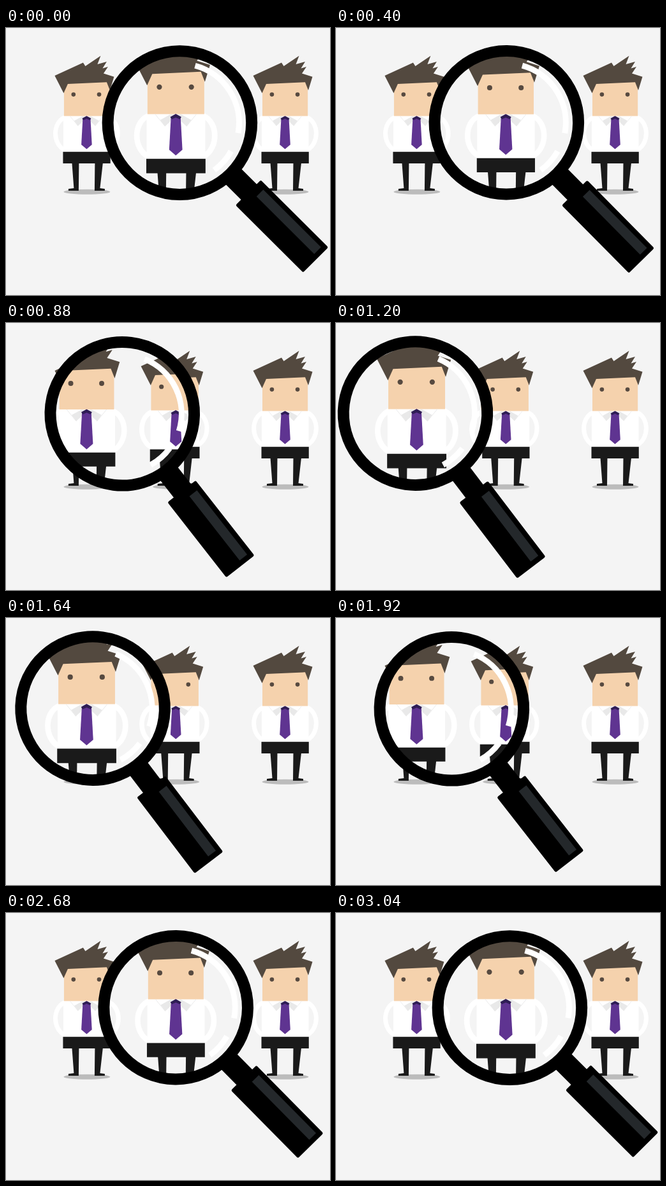
Animation of 508 by 420 pixels, one loop 3120 ms. Source, as an HTML page:

```html
<!DOCTYPE html>
<html lang="en">
<head>
<meta charset="utf-8">
<title>Magnifier</title>
<style>
  html, body { margin: 0; width: 100%; height: 100%; overflow: hidden; background: #f4f4f4; }
  svg { display: block; width: 100vw; height: 100vh; }
</style>
</head>
<body>
<svg viewBox="0 0 508 420">
  <defs>
    <clipPath id="glass"><circle id="hole" r="106"/></clipPath>
    <!-- x = 0 runs through the tie -->
    <g id="man">
      <ellipse cx=".5" cy="257.7" rx="36.5" ry="4" fill="#bcbcbc"/>
      <path d="M-35 141C-53 149-54 181-35 192M35 141C53 149 54 181 35 192" fill="none" stroke="#fff" stroke-width="7"/>
      <path d="M-36.5 138H37V196H-36.5Z" fill="#fff"/>
      <path d="M-23 212H-12L-12.5 256H-28.5V253L-20 252ZM13 212H25.5L21 252 28.5 253V256H12.5Z" fill="#1a1a1a"/>
      <path d="M-37 194.8H37.3V213H-37Z" fill="#1a1a1a"/>
      <path d="M-35.5 84H35.7V138.6H-35.5Z" fill="#f5d2ad"/>
      <path d="M-19.5 146L-7 139H7L19.5 146 13.5 154 4 145H-4L-13.5 154Z" fill="#e9e9e9"/>
      <path d="M-26 138.6L-13.5 154M26 138.6L13.5 154" stroke="#eaeaea" stroke-width=".8"/>
      <path d="M-6 142L0 138.5 6 142 8.3 183.5 0 190.6-8.3 183.5Z" fill="#5f3491"/>
      <path d="M0 138.5L7 142.2 5 145 0 142.8-5 145-7 142.2Z" fill="#2f1d55"/>
      <path d="M-50 75L-5.5 54.6-2 60 22 43.8 17 57 31.5 53 25 63.5 33.5 61 26.5 71.5 43 76.7 36.5 98 31.5 85.3-29.5 88-36 102.5Z" fill="#53493f"/>
      <circle cx="-20.6" cy="104.6" r="3.3" fill="#574a40"/>
      <circle cx="19.6" cy="104.6" r="3.3" fill="#574a40"/>
    </g>
  </defs>
  <rect width="508" height="420" fill="#f4f4f4"/>
  <use href="#man" x="126.4"/>
  <use href="#man" x="266.2"/>
  <use href="#man" x="437.5"/>
  <g clip-path="url(#glass)">
    <rect width="508" height="420" fill="#f4f4f4"/>
    <use href="#man" id="mid"/>
    <use href="#man" id="left"/>
    <use href="#man" x="437.5"/>
  </g>
  <g id="lens">
    <path id="glare" fill="none" stroke="#fff" stroke-width="9"/>
    <circle r="112.8" fill="none" stroke="#000" stroke-width="18"/>
    <rect x="112" y="-17" width="46" height="34.5"/>
    <rect x="153.5" y="-26.2" width="149.8" height="56" rx="2.5"/>
    <rect x="167" y="-18.2" width="128" height="15" fill="#24282b"/>
  </g>
</svg>
<script>
const LOOP = 3120, STEP = 40, PIVOT = 151.5;
const $ = id => document.getElementById(id);

function arc(r, from, to) {
  const at = deg => {
    const a = deg * Math.PI / 180;
    return (r * Math.cos(a)).toFixed(2) + ' ' + (r * Math.sin(a)).toFixed(2);
  };
  return `M${at(from)}A${r} ${r} 0 0 1 ${at(to)}`;
}
$('glare').setAttribute('d', arc(93, -120, -35) + arc(92, -16, 9));

// cubic-bezier(x1, 0, x2, 1)
function ease(p, x1, x2) {
  if (p <= 0) return 0;
  if (p >= 1) return 1;
  let lo = 0, hi = 1, s = .5;
  for (let i = 0; i < 30; i++) {
    s = (lo + hi) / 2;
    const x = 3 * s * (1 - s) * ((1 - s) * x1 + s * x2) + s * s * s;
    if (x < p) lo = s; else hi = s;
  }
  return s * s * (3 - 2 * s);
}

// share of the tilt along the path: [position, tilt, slope]
const TILT = [[0, 0, 1.35], [.155, .225, 1.65], [.375, .625, 1.55], [.6, .896, .7], [1, 1, 0]];

function tilt(u) {
  let i = 0;
  while (i < TILT.length - 2 && u > TILT[i + 1][0]) i++;
  const [x0, y0, m0] = TILT[i], [x1, y1, m1] = TILT[i + 1];
  const h = x1 - x0, s = (u - x0) / h, r = 1 - s;
  return y0 * (1 + 2 * s) * r * r + y1 * s * s * (3 - 2 * s) + h * s * r * (m0 * r - m1 * s);
}

function progress(t) {
  return t < 1400 ? ease((t - 200) / 1000, .67, .67) : 1 - ease((t - 1400) / 1640, .33, .33);
}

function zoom(id, x, k) {
  $(id).setAttribute('transform', `translate(${x} ${PIVOT}) scale(${k}) translate(0 ${-PIVOT})`);
}

function draw(ms) {
  const t = Math.floor(ms % LOOP / STEP) * STEP;
  const u = progress(t), v = tilt(u);
  const x = 272.4 - 148 * u, y = 149.1 - 7 * v;
  $('hole').setAttribute('cx', x);
  $('hole').setAttribute('cy', y);
  $('lens').setAttribute('transform', `translate(${x} ${y}) rotate(${45 + 7.8 * v})`);
  zoom('mid', 266.2, 1.09 + .16 * (1 - u) ** 4.4);
  zoom('left', 126.4, 1.25 - .25 * (1 - u) ** 1.85);
}

const start = performance.now();
function tick() {
  draw(performance.now() - start);
  requestAnimationFrame(tick);
}
tick();
</script>
</body>
</html>
```
